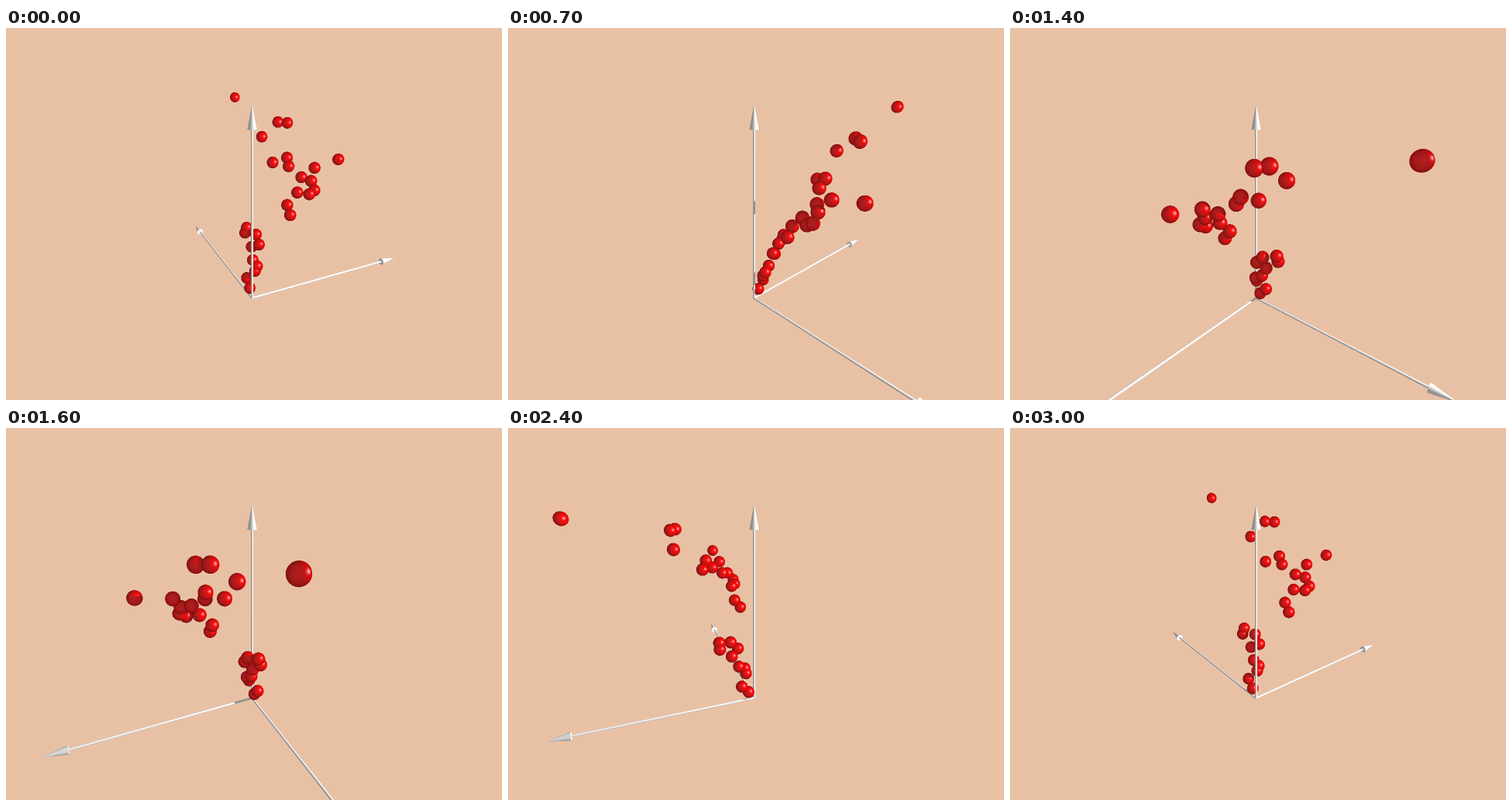
A matplotlib script that plays this animation: 640x480 px, repeating every 3100 ms.

```python
import numpy as np
import matplotlib.pyplot as plt
from matplotlib.animation import FuncAnimation

W, H, SS = 640, 480, 2            # stage size and samples per pixel side
FRAMES, INTERVAL = 31, 100
STEP, START = 12.0, 25.2          # degrees per frame, first bearing of the x axis
BACKDROP = np.array([232, 193, 165], dtype=np.float32)

# Camera: focal length in pixels, image centre, tilt and distance (axis length = 1)
FOCAL, CX, CY = 484.6, 317.5, 240.4
SIN, COS, DIST, DROP = 0.395, 0.9187, 2.003, 0.4465

BALL_R = 0.0308
SHAFT_R, CONE_R, CONE_AT = 0.0055, 0.0205, 0.893
BALL, ARROW = 1, 2

POINTS = np.array([
    (.251, .790, .942), (.539, .067, .680), (.310, .326, .853),
    (.352, .296, .850), (.214, .330, .780), (.213, .197, .669),
    (.280, .164, .695), (.274, .134, .657), (.390, .066, .652),
    (.315, .071, .610), (.351, .033, .596), (.352, .001, .555),
    (.323, .001, .538), (.271, .033, .545), (.215, .034, .485),
    (.216, .003, .441), (.046, .166, .336), (.036, .167, .305),
    (.071, .102, .317), (.070, .064, .275), (.046, .104, .248),
    (.037, .070, .187), (.046, .036, .165), (.033, .033, .141),
    (.000, .067, .087), (.001, .030, .045),
])


def to_eye(side, near, up):
    """Turntable coordinates to camera coordinates (right, up, forward)."""
    return np.stack([side,
                     COS * up - SIN * near - DROP,
                     DIST - COS * near - SIN * up], axis=-1)


def turn(p, degrees):
    a = np.radians(degrees)
    x, y, z = np.asarray(p, dtype=float).T
    return to_eye(x * np.cos(a) - y * np.sin(a),
                  -x * np.sin(a) - y * np.cos(a), z)


def project(p):
    return np.array([CX + FOCAL * p[0] / p[2], CY - FOCAL * p[1] / p[2]])


def unit(v):
    return v / np.maximum(np.linalg.norm(v, axis=-1, keepdims=True), 1e-9)


LIGHT = to_eye(1.6, 0.7, 1.3)

rows, cols = np.mgrid[:H * SS, :W * SS]
RAYS = np.stack([((cols + .5) / SS - CX) / FOCAL,
                 (CY - (rows + .5) / SS) / FOCAL,
                 np.ones(rows.shape)], axis=-1).reshape(-1, 3)


def samples_near(p, q, margin):
    """Flat indices of the samples closer than margin to the segment p-q."""
    limit = (W * SS, H * SS)
    x0, y0 = np.clip((np.minimum(p, q) - margin) * SS, 0, limit).astype(int)
    x1, y1 = np.clip((np.maximum(p, q) + margin) * SS + 1, 0, limit).astype(int)
    ys, xs = np.mgrid[y0:y1, x0:x1]
    dx, dy = (xs + .5) / SS - p[0], (ys + .5) / SS - p[1]
    d = q - p
    t = np.clip((dx * d[0] + dy * d[1]) / max(d @ d, 1e-9), 0, 1)
    close = np.hypot(dx - t * d[0], dy - t * d[1]) < margin
    return ys[close] * W * SS + xs[close]


class Buffer:
    """Depth buffer that keeps the normal and material of the nearest hit."""

    def __init__(self):
        n = len(RAYS)
        self.depth = np.full(n, np.inf)
        self.normal = np.zeros((n, 3))
        self.kind = np.zeros(n, dtype=np.int8)

    def put(self, idx, t, normal, ok, kind):
        ok = ok & (t > 0) & (t < self.depth[idx])
        idx = idx[ok]
        self.depth[idx] = t[ok]
        self.normal[idx] = normal[ok]
        self.kind[idx] = kind

    def ball(self, centre):
        at = project(centre)
        idx = samples_near(at, at, 1.4 * FOCAL * BALL_R / centre[2])
        v = RAYS[idx]
        a, b = (v * v).sum(1), v @ centre
        disc = b * b - a * (centre @ centre - BALL_R ** 2)
        t = (b - np.sqrt(np.maximum(disc, 0))) / a
        normal = (v * t[:, None] - centre) / BALL_R
        self.put(idx, t, normal, disc > 0, BALL)

    def frustum(self, p, q, rp, rq, cap=False):
        """Round solid from p to q whose radius runs from rp to rq."""
        idx = samples_near(project(p), project(q), 14)
        v = RAYS[idx]
        length = np.linalg.norm(q - p)
        axis = (q - p) / length
        slope = (rq - rp) / length
        vn, pn = v @ axis, p @ axis
        r0 = rp - slope * pn
        a = (v * v).sum(1) - vn ** 2 * (1 + slope ** 2)
        b = vn * pn - v @ p - r0 * slope * vn
        c = p @ p - pn ** 2 - r0 ** 2
        disc = b * b - a * c
        t = (-b - np.sqrt(np.maximum(disc, 0))) / a
        m = t * vn - pn
        out = v * t[:, None] - p - m[:, None] * axis
        normal = unit(unit(out) - slope * axis)
        self.put(idx, t, normal, (disc > 0) & (m > 0) & (m < length), ARROW)
        if cap:
            t = pn / np.where(np.abs(vn) < 1e-9, 1e-9, vn)
            inside = np.linalg.norm(v * t[:, None] - p, axis=1) < rp
            self.put(idx, t, np.tile(-axis, (len(idx), 1)), inside & (vn > 0), ARROW)

    def shade(self, balls):
        hit = np.flatnonzero(self.kind)
        pos = RAYS[hit] * self.depth[hit][:, None]
        normal, kind = self.normal[hit], self.kind[hit]
        to_light, to_view = unit(LIGHT - pos), unit(-pos)

        along = to_light @ balls.T - (to_light * pos).sum(1)[:, None]
        gap = ((balls ** 2).sum(1) - 2 * pos @ balls.T
               + (pos ** 2).sum(1)[:, None] - along ** 2)
        shadow = ((along > .1 * BALL_R) & (gap < BALL_R ** 2)).any(1)

        lit = np.maximum((normal * to_light).sum(1), 0) * ~shadow
        facing = np.maximum((normal * to_view).sum(1), 0)
        half = unit(to_light + to_view)
        shine = np.maximum((normal * half).sum(1), 0) ** 45 * (lit > 0)

        red = 110 + 65 * facing + 100 * lit + 60 * shine
        rest = 8 + 22 * facing * (1 - lit) + 170 * shine
        ball = np.stack([red, rest, rest], axis=1)
        arrow = (145 + 145 * lit)[:, None] * np.array([1, .99, .98])

        colour = np.tile(BACKDROP, (len(RAYS), 1))
        colour[hit] = np.clip(np.where((kind == BALL)[:, None], ball, arrow), 0, 255)
        image = colour.reshape(H, SS, W, SS, 3).mean(axis=(1, 3))
        return np.round(image).astype(np.uint8)


def render(degrees):
    buf = Buffer()
    origin = turn([(0, 0, 0)], degrees)[0]
    for tip in turn(np.eye(3), degrees):
        base = origin + CONE_AT * (tip - origin)
        buf.frustum(origin, base, SHAFT_R, SHAFT_R)
        buf.frustum(base, tip, CONE_R, 0, cap=True)
    balls = turn(POINTS, degrees)
    for centre in balls:
        buf.ball(centre)
    return buf.shade(balls)


# The opening view is held for two frames, then the scene turns steadily.
views = [render(START - STEP * i) for i in range(FRAMES - 1)]

fig = plt.figure(figsize=(W / 100, H / 100), dpi=100)
ax = fig.add_axes([0, 0, 1, 1])
ax.axis("off")
picture = ax.imshow(views[0], interpolation="nearest", aspect="auto")


def update(i):
    picture.set_data(views[max(i - 1, 0)])
    return [picture]


anim = FuncAnimation(fig, update, frames=FRAMES, interval=INTERVAL,
                     repeat=True, repeat_delay=0, blit=False)
plt.show()
```
